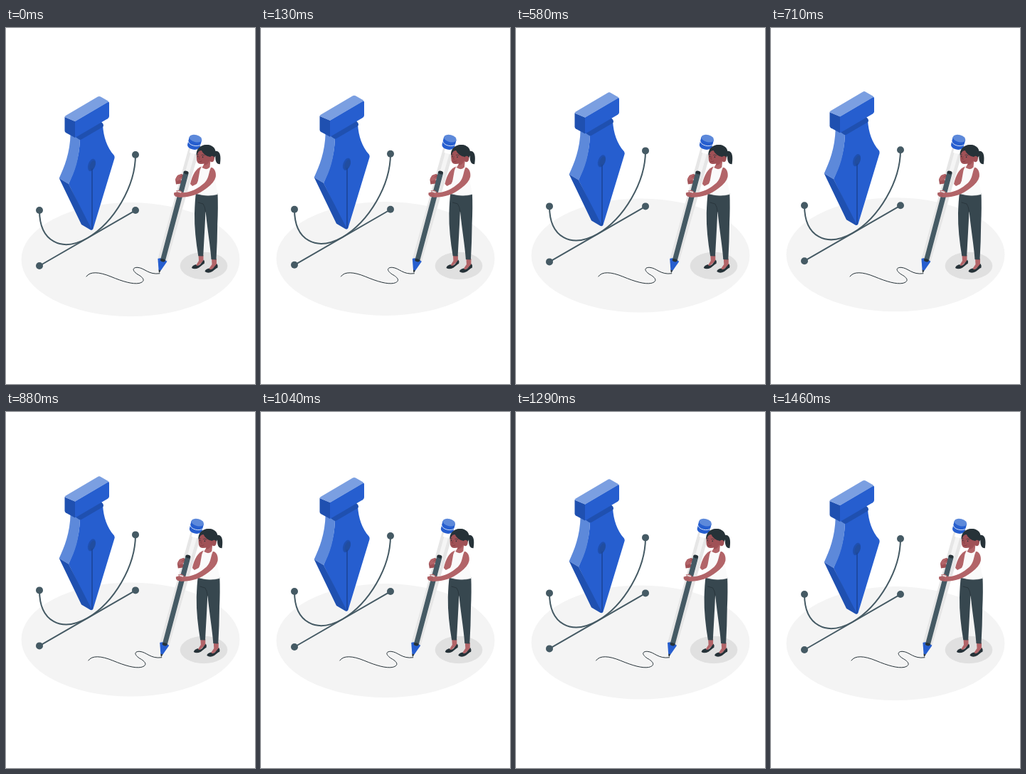
An HTML page with a canvas that plays this animation: 350 by 500 pixels, repeating every 1500 ms.

```html
<!DOCTYPE html>
<html lang="en">
<head>
<meta charset="utf-8">
<title>Drawing with a pencil</title>
<style>
html, body { margin: 0; width: 100%; height: 100%; overflow: hidden; background: #fff; }
canvas { display: block; width: 350px; height: 500px; }
</style>
</head>
<body>
<canvas id="stage"></canvas>
<script>
const WIDTH = 350, HEIGHT = 500, LOOP = 1500, STEPS = 36;
const BLUE = '#265ecf', SKY = '#5d89da', PALE = '#7b9fe1', NAVY = '#1f50b0', INK = '#263238',
      SLATE = '#455a64', PANTS = '#37474f', SKIN = '#b26468', FACE = '#a05156', SHIRT = '#fafafa';

const canvas = document.getElementById('stage');
const ctx = canvas.getContext('2d');
const ratio = window.devicePixelRatio || 1;
canvas.width = WIDTH * ratio;
canvas.height = HEIGHT * ratio;

function fill(color, d) {
  ctx.fillStyle = color;
  ctx.fill(new Path2D(d));
}

function stroke(color, width, d) {
  ctx.strokeStyle = color;
  ctx.lineWidth = width;
  ctx.stroke(new Path2D(d));
}

function oval(color, x, y, rx, ry = rx, angle = 0) {
  ctx.fillStyle = color;
  ctx.beginPath();
  ctx.ellipse(x, y, rx, ry, angle, 0, Math.PI * 2);
  ctx.fill();
}

function moved(x, y, draw) {
  ctx.save();
  ctx.translate(x, y);
  draw();
  ctx.restore();
}

function drawFloor() {
  oval('#f4f4f4', 175, 325.1, 153.5, 80);
}

function drawBezier() {
  stroke(SLATE, 2, 'M47 334 L182 256.2');
  stroke(SLATE, 2, 'M47 256 C47 300 78 315.5 114.5 295 C152 273 182 222 182 178');
  for (const [x, y] of [[47, 256], [47, 334], [182, 256], [182, 178]]) oval(SLATE, x, y, 5);
}

function drawNib() {
  fill(BLUE, 'M104 156 L136 136.5 C137 153 142 168 152 179 Q153 181 152.5 183 L122.5 282 Q121.5 284.5 119 283 L88 219 C95 203 103 184 104 156 Z');
  fill(SKY, 'M90.7 148 L104 156 C103 184 97 202 88 219 L74.7 211 C82 195 90 176 90.7 148 Z');
  fill(NAVY, 'M74.7 211 L88 219 L121 283.7 Q119 284 117 282.5 L106 276 Z');
  fill(NAVY, 'M92 149 L132 130 L136 134 Q138 137 136 139 L106 156.5 Q104 157.5 102 156 Z');
  oval(NAVY, 120.5, 192.5, 5, 9, .35);
  oval('#214d9f', 121.5, 193, 3.6, 7.3, .35);
  stroke('#1b4596', 1.5, 'M121 198 V282');

  fill(BLUE, 'M97 131 L143 104 Q145 103 145 105.5 V124 Q145 126 143 127.3 L99 153 Q97 154 95.5 153 Z');
  fill(NAVY, 'M82.5 125 L97 131 V154 L84 147 Q82.5 146 82.5 144 Z');
  fill(PALE, 'M82.5 125 Q82.5 124 84 123 L129 96.5 Q131 95.3 133 96.5 L143.5 102.5 Q144.7 103.3 143.5 104 L97 131.3 Z');
}

function drawFarArm() {
  fill(SKIN, 'M275 194.5 C267 197 262 206 259 219 L262 222 L268 219 L274 207 Z');
}

function drawPencil() {
  fill('#e6e6e6', 'M257.2 167 L272 170.7 L226.5 328 L213.5 324 Z');
  fill('#f5f5f5', 'M261.5 168 L267.5 169.6 L222 327 L218 326 Z');
  fill('#fff', 'M259.5 168.5 L269.5 171 L267.5 177.5 L258 175 Z');

  fill(BLUE, 'M257.7 153 L275.2 157.5 L272.3 168.3 Q268 172.5 261.5 170.3 Q255 168.5 255 164 Z');
  stroke('#fff', .8, 'M256.2 159.3 Q257 163.4 263.8 165.2 Q270.5 166.6 274 163.7');
  oval(SKY, 266.5, 155.2, 9, 5, .25);

  // Far hand wraps the barrel behind the refill.
  fill(FACE, 'M238 213 L241 207 L247 205 L250 207 L248 211 L245 213 L249 215 L246 218.5 L239 219.5 Z');
  fill(SKIN, 'M238.2 212 Q240 206.5 246 205.3 L247 207 L243 210 L249 209.5 L246 213 L240 215 Z');

  fill(BLUE, 'M213.4 324 Q220 321.5 226.4 328 L217.7 340.5 L214.6 340 Z');
  fill(INK, 'M214.6 339.6 L217.7 340.4 L215.5 344 Q214.3 343.2 214.6 339.6 Z');
  fill(SLATE, 'M249.6 202.5 L256.6 204.5 L223.7 327.5 L217 325.7 Z');
  oval(INK, 220.3, 326.2, 3.5, 2.1, .25);
  oval(INK, 253.1, 203, 3.6, 2.2, .25);
}

function drawLegs() {
  fill(SKIN, 'M270.5 318 L277.5 319 L277.5 327 L270 334 L266 335 L271 327 Z');
  fill(SKIN, 'M289 323 L296 324 L296 333 L288 340 L284 340 L289.5 332 Z');
  fill(INK, 'M261 337 Q261.5 333.5 267 332 Q268 336 273 332 L278 325.5 Q280 328 278.7 331 L277.5 331.5 L271 336.7 Q265 339.8 261 337 Z');
  fill(INK, 'M279.5 342 Q280 338.5 285.5 337.5 Q287 341 291 337.5 L296.5 331 Q298.5 334 297.3 337 L296 337.2 L290 342 Q284 345.5 279.5 342 Z');
  fill(PANTS, 'M267 231 L297.5 232 Q298.3 252 297.2 275 Q297 300 295.5 325.5 L288.5 325 C287 305 283 282 280.5 257 C279.5 280 278.3 300 277.2 320.5 L270.3 320.3 C267 300 264.6 280 265 260 Q265.5 243 267 231 Z');
  stroke(INK, .8, 'M270 245 L277 247 Q280 251 280.5 258');
}

function drawHead() {
  oval(INK, 283, 174, 11.5, 10);
  fill(INK, 'M291 175 Q294 171.5 298 173.5 C302 176 302 184 300.8 191.3 C296 191.5 294 187 294.3 180 Z');
  fill(SKIN, 'M278 185 L287.5 185 L286.5 195.5 Q282 200.5 275.5 196 L278.5 191 Z');
  fill(FACE, 'M278.5 190.5 Q283 189.5 286 187 Q284 192 278.5 193 Z');
  fill(FACE, 'M269 173 Q267 180 268.2 186.5 Q269.5 191 274 191 Q281 191 286 187 L289 177 L280 171 Z');
  fill(INK, 'M267.7 179 C266.5 170 274 163.5 282 164 C291 164 296 172 294 180 Q292 185 288 187 L287 181 Q278.5 180 274.5 171.5 Q270 172.5 268.6 178 Z');
  oval(FACE, 289.5, 184, 3.3, 4.2, .3);
  oval(INK, 276.6, 181.3, .7, 1);
  oval(INK, 269.7, 180.5, .6, .9);
  stroke(INK, .6, 'M275 178.4 Q277 177.5 278.8 179 M269 178 L270.5 177.8');
  stroke('#7e383e', .7, 'M272 180.5 L270.8 184 L272.3 184.3 M271 187.3 Q273 188.3 275 187');
}

function drawBody() {
  drawLegs();
  fill(SHIRT, 'M274.5 195 Q280 203 288 194.5 L294 202 L294.5 217 L297.8 233.5 Q284 237.5 266.7 232.5 L270 214 L272.5 200 Z');
  stroke('#ececec', .6, 'M267 232.6 Q284 237.4 297.5 233.5');
  drawHead();
  fill(SKIN, 'M288 196 C292 195 296 202 294.8 209 Q293 217 282 225 C271 234 258 237.5 246 237.8 Q240 238.5 236.3 235 L236 231.5 L241 230 L238.8 228.5 L244 227.5 L249 231.3 C260 230.8 270 225.5 279 217.5 C286 210 284.5 203 288 196 Z');
  fill('#e6e6e6', 'M240.8 228.5 L246.5 230 L246 231.7 L241 230.3 Z');
  stroke(FACE, .7, 'M236.5 233.2 L243 233.5 M238 236 L244 235.7');
}

function drawArtist() {
  stroke(INK, 1, 'M113 349 C118 341.5 131 342.5 147 349 C165 356.5 178 360 187 358.5 C197 356 193.5 350.5 185 346 C176 340 178.5 336 185 336.3 C195 337 200 347 216 344.8');
  drawPencil();
  drawFarArm();
  drawBody();
}

// Piecewise linear shake, mirrored around the middle of the loop.
function shakeAt(phase) {
  const stops = [0, -1, 2, -4, 4, -4];
  const place = Math.min(phase, 1 - phase) * 10;
  const i = Math.min(Math.floor(place), 4);
  return .7 * (stops[i] + (stops[i + 1] - stops[i]) * (place - i));
}

function render(now) {
  const step = Math.floor((now % LOOP + 4) * STEPS / LOOP) % STEPS;
  const phase = step / (STEPS - 1);
  const lift = -14 * Math.min(phase, 1 - phase);

  ctx.setTransform(ratio, 0, 0, ratio, 0, 0);
  ctx.fillStyle = '#fff';
  ctx.fillRect(0, 0, WIDTH, HEIGHT);
  ctx.lineCap = ctx.lineJoin = 'round';

  moved(0, lift, drawFloor);
  oval('#e0e0e0', 278, 334, 33.3, 19.2);
  moved(0, lift, () => { drawBezier(); drawNib(); });
  moved(shakeAt(phase), 0, drawArtist);
}

let start;
function tick(now) {
  start ??= now;
  render(now - start);
  requestAnimationFrame(tick);
}
render(0);
requestAnimationFrame(tick);
</script>
</body>
</html>
```
